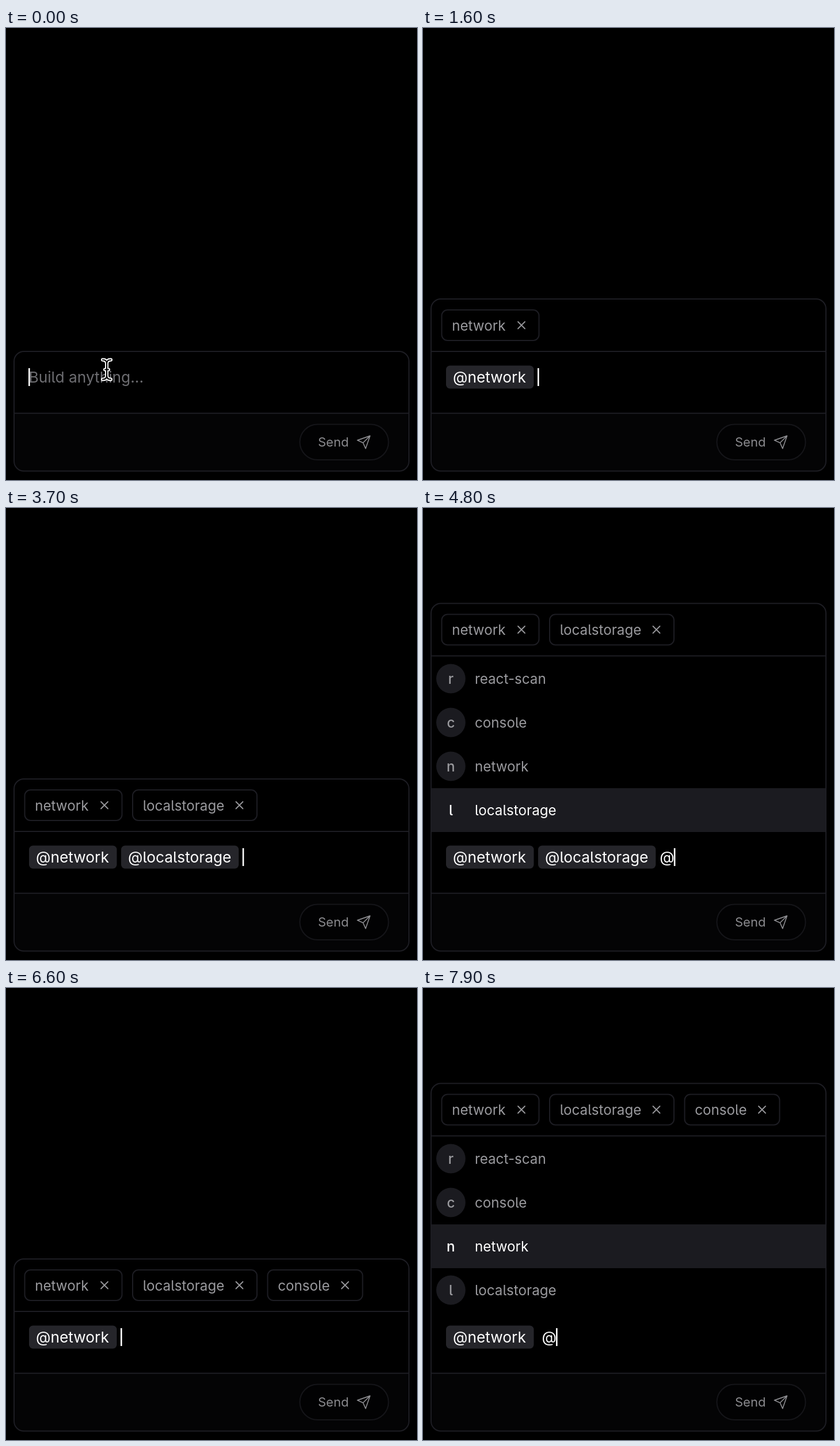
Write an HTML page that moves like this. It is 714 by 784 pixels and loops after 8 s.

```html
<!DOCTYPE html>
<html lang="en">
<head>
<meta charset="utf-8">
<title>Mention input</title>
<style>
  html, body { margin: 0; width: 100%; height: 100%; overflow: hidden; background: #000; }
  svg { display: block; width: 714px; height: 784px; font: 24.2px Inter, Roboto, sans-serif; font-feature-settings: "cv05"; }
  text { white-space: pre; fill: #9a9a9e; }
  .line { fill: none; stroke: #1d1d23; stroke-width: 2; }
  .chip { fill: #000; stroke: #1d1d23; stroke-width: 2; }
  .input { font-size: 26.3px; fill: #fff; }
  .icon { fill: none; stroke: #98989c; stroke-width: 1.8; stroke-linecap: round; stroke-linejoin: round; }
  .avatar { fill: #1b1b20; }
  .letter { text-anchor: middle; font-weight: 500; }
  .active { fill: #fff; }
</style>
</head>
<body>
<svg viewBox="0 0 714 784">
  <defs>
    <clipPath id="inside"><rect id="clip" x="14" width="686" rx="17"/></clipPath>
  </defs>
  <rect width="714" height="784" fill="#000"/>
  <g clip-path="url(#inside)">
    <rect x="14" y="668" width="686" height="101" fill="#040405"/>
    <g id="menu"></g>
  </g>
  <g id="chips"></g>
  <path class="line" d="M14 668.3H700"/>
  <rect id="frame" class="line" x="14" width="686" rx="17"/>
  <rect x="510.5" y="687.5" width="154" height="61.5" rx="30.7" fill="#020203" stroke="#151519" stroke-width="2"/>
  <text x="542" y="726" style="font-size:22px;fill:#8b8b8f">Send</text>
  <path class="icon" transform="translate(608.2 705.2) scale(1.1)" style="stroke-width:1.5;stroke:#8b8b8f"
        d="M22 2 11 13M22 2 15 22 11 13 2 9Z"/>
  <g id="input"></g>
  <rect id="caret" y="590" width="2.6" height="31" fill="#fff"/>
  <g id="pointer" fill="none" stroke-linecap="round">
    <path id="beam" d="M168 575.5Q175 575.5 175 582V603Q175 609.5 168 609.5M182 575.5Q175 575.5 175 582M182 609.5Q175 609.5 175 603M172 592.5H178"/>
    <use href="#beam" stroke="#fff" stroke-width="6"/>
    <use href="#beam" stroke="#000" stroke-width="2.2"/>
  </g>
</svg>
<script>
const LOOP = 8000, BOTTOM = 768.5, BLINK = 500;
const TOOLS = ["react-scan", "console", "network", "localstorage"];
const CHIP_WIDTH = { network: 170, localstorage: 217, console: 166 };
const PILL_WIDTH = { network: 152.5, localstorage: 204.3, console: 149 };
const AT_WIDTH = 25, SPACE = 7.5;

// Each step merges into the state; setting `tail` or `pills` restarts the caret blink.
const STEPS = [
  [0,    { pills: [], chips: [], tail: "", menu: false, active: 0 }],
  [400,  { tail: "@", menu: true }],
  [800,  { active: 1 }],
  [1200, { active: 2 }],
  [1600, { pills: ["network"], chips: ["network"], tail: "", menu: false }],
  [2300, { tail: "@", menu: true }],
  [2900, { active: 3 }],
  [3300, { pills: ["network", "localstorage"], chips: ["network", "localstorage"], tail: "", menu: false }],
  [4400, { tail: "@", menu: true }],
  [4900, { active: 2 }],
  [5100, { active: 1 }],
  [5300, { pills: ["network", "localstorage", "console"], chips: ["network", "localstorage", "console"], tail: "", menu: false }],
  [5900, { pills: ["network", "localstorage"] }],
  [6300, { pills: ["network"] }],
  [6900, { tail: " " }],
  [7450, { tail: " @", menu: true }],
  [7750, { active: 2 }],
];

const $ = id => document.getElementById(id);
const label = (x, y, text, cls = "") => `<text x="${x}" y="${y}" class="${cls}">${text}</text>`;

function stateAt(t) {
  const state = { typedAt: 0 };
  for (const [time, change] of STEPS) {
    if (time > t) break;
    Object.assign(state, change);
    if ("tail" in change || "pills" in change) state.typedAt = time;
  }
  return state;
}

function menuMarkup(active) {
  return TOOLS.map((name, i) => {
    const y = 258 + i * 76, on = i === active, cls = on ? "active" : "";
    const back = on
      ? `<rect class="avatar" x="14" y="${y}" width="686" height="76"/>`
      : `<circle class="avatar" cx="48.4" cy="${y + 38}" r="25.4"/>`;
    return back + label(48.4, y + 46.5, name[0], "letter " + cls) + label(90, y + 47, name, cls);
  }).join("");
}

function chipsMarkup(chips, top) {
  let x = 32;
  return chips.map(name => {
    const w = CHIP_WIDTH[name], cx = x + w - 31, cy = top + 45.5;
    const markup = `<rect class="chip" x="${x + 0.5}" y="${top + 19}" width="${w - 1}" height="53" rx="10"/>`
      + label(x + 18.2, cy + 9, name)
      + `<path class="icon" d="M${cx - 6} ${cy - 6}l12 12m0-12l-12 12"/>`;
    x += w + 17.5;
    return markup;
  }).join("") + `<path class="line" d="M14 ${top + 91}H700"/>`;
}

function drawInput({ pills, tail }) {
  let x = 40, markup = "";
  for (const name of pills) {
    markup += `<rect x="${x}" y="585.5" width="${PILL_WIDTH[name]}" height="40" rx="7" fill="#25252a"/>`
      + label(x + 12, 615, "@" + name, "input");
    x += PILL_WIDTH[name] + SPACE;
  }
  if (tail[0] === " ") x += SPACE - 0.5;
  if (tail.endsWith("@")) {
    markup += label(x - 0.5, 615, "@", "input");
    x += AT_WIDTH;
  }
  if (!pills.length && !tail)
    markup = `<text x="39.5" y="615" class="input" style="fill:#6d6d71">Build anything...</text>`;
  $("input").innerHTML = markup;
  $("caret").setAttribute("x", x - 1);
}

let drawn = "";
function render(t) {
  const state = stateAt(t), key = JSON.stringify(state);
  const blinkOn = Math.floor((t - state.typedAt) / BLINK) % 2 === 0;
  $("caret").style.display = blinkOn ? "" : "none";
  if (key === drawn) return;
  drawn = key;
  const top = 561 - (state.menu ? 304.5 : 0) - (state.chips.length ? 91 : 0);
  for (const id of ["frame", "clip"]) {
    $(id).setAttribute("y", top);
    $(id).setAttribute("height", BOTTOM - top);
  }
  $("menu").innerHTML = state.menu ? menuMarkup(state.active) : "";
  $("chips").innerHTML = state.chips.length ? chipsMarkup(state.chips, top) : "";
  $("pointer").style.display = state.typedAt === 0 ? "" : "none";
  drawInput(state);
}

const start = performance.now();
function tick() {
  render((performance.now() - start) % LOOP);
  requestAnimationFrame(tick);
}
tick();
</script>
</body>
</html>
```
